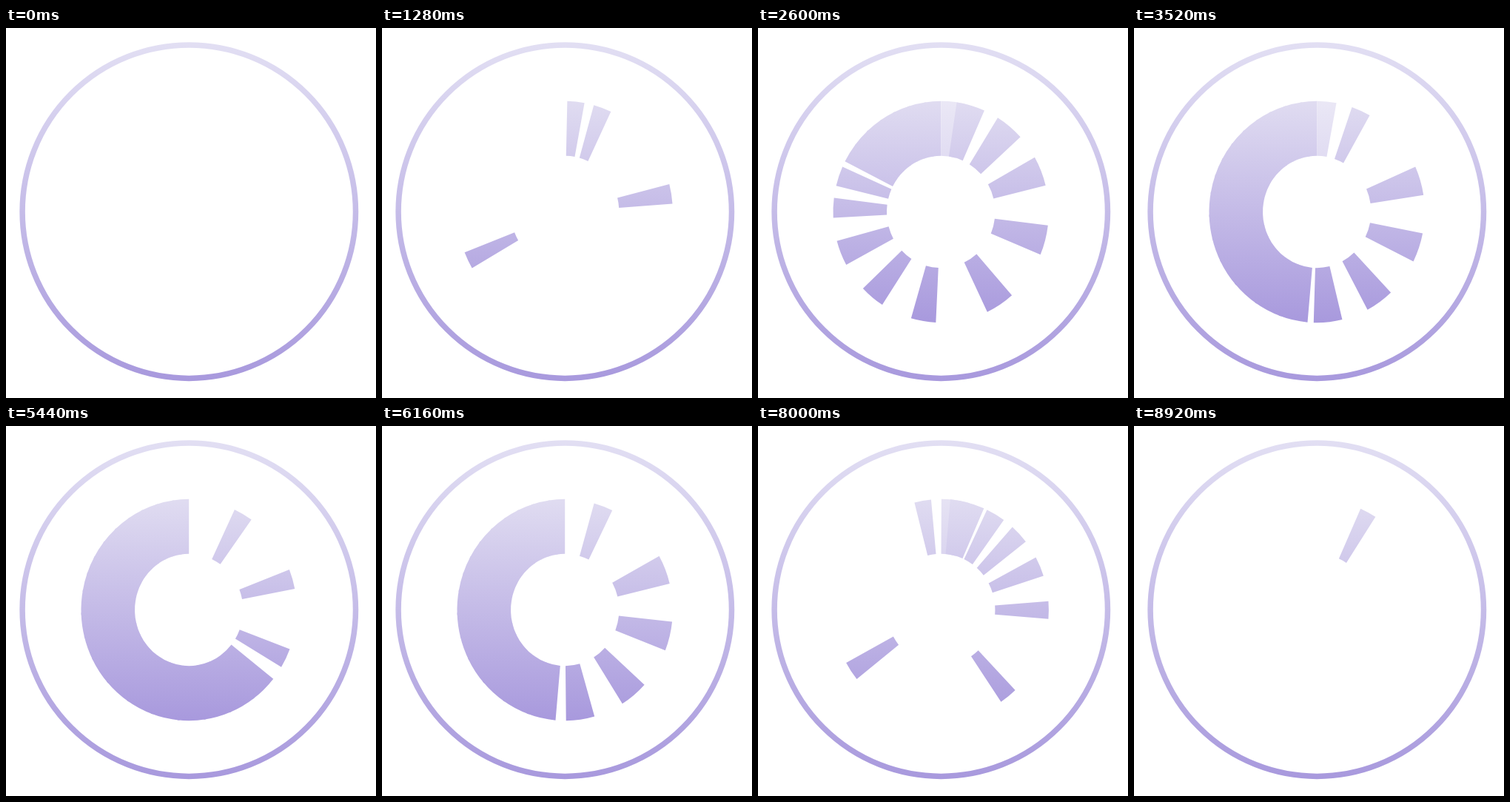
Animation, 500 px wide and 500 px high, one loop 8960 ms. Source, as an HTML page:

```html
<!DOCTYPE html>
<html lang="en">
<head>
<meta charset="utf-8">
<title>Ring</title>
<style>
  html, body { margin: 0; width: 100%; height: 100%; overflow: hidden; background: #fff; }
  svg { display: block; width: 100%; height: 100%; }
</style>
</head>
<body>
<svg viewBox="0 0 500 500">
  <defs>
    <linearGradient id="ringTint" gradientUnits="userSpaceOnUse" x1="0" y1="19" x2="0" y2="477">
      <stop offset="0" stop-color="#e2dff3"/>
      <stop offset="1" stop-color="#a899dd"/>
    </linearGradient>
    <linearGradient id="sliceTint" gradientUnits="userSpaceOnUse" x1="0" y1="99" x2="0" y2="398">
      <stop offset="0" stop-color="#e0dcf1"/>
      <stop offset="1" stop-color="#a899dd"/>
    </linearGradient>
  </defs>
  <circle cx="247.3" cy="248.2" r="225.2" fill="none" stroke="url(#ringTint)" stroke-width="7.5"/>
  <g id="slices" fill="url(#sliceTint)"></g>
</svg>
<script>
const LOOP = 8960, STEP = 40;
const START = 560, PEAK = 4240, RETURN = 5440, MIRROR = 9650;
const COUNT = 23, TRAVEL = 1220, OVERLAP = 1.2;
const CX = 247.2, CY = 248.5;
const OUTER = [145.7, 149.7], INNER = [73.2, 75.7];

// The launch rate rises, then slows; slices between these are spaced evenly.
const keys = [
  { index: 1, launch: 525, rest: 351 },
  { index: 2, launch: 900, rest: 342 },
  { index: 3, launch: 1111, rest: 333.5 },
  { index: 4, launch: 1232, rest: 325.5 },
  { index: 9, launch: 1546, rest: 279.5 },
  { index: 12, launch: 1785, rest: 243 },
  { index: 16, launch: 2268, rest: 185 },
  { index: 20, launch: 2900, rest: 128.5 },
  { index: COUNT, launch: 3805, rest: 101 }
];

const clamp = x => Math.min(1, Math.max(0, x));
const mix = (a, b, p) => a + (b - a) * p;
const easeSine = p => (1 - Math.cos(Math.PI * p)) / 2;

function between(index, field) {
  const next = Math.max(1, keys.findIndex(key => key.index >= index));
  const a = keys[next - 1], b = keys[next];
  return mix(a[field], b[field], (index - a.index) / (b.index - a.index));
}

const group = document.getElementById("slices");
let edge = 360;
const slices = Array.from({ length: COUNT }, (_, i) => {
  const path = document.createElementNS("http://www.w3.org/2000/svg", "path");
  group.append(path);
  const launch = between(i + 1, "launch"), rest = between(i + 1, "rest");
  const width = Math.min(360, edge + OVERLAP) - rest;
  edge = rest;
  return { path, launch, rest, width };
});

// Angles run clockwise from the top.
function point([rx, ry], degrees) {
  const a = degrees * Math.PI / 180;
  return (CX + rx * Math.sin(a)).toFixed(2) + " " + (CY - ry * Math.cos(a)).toFixed(2);
}

function sector(from, to) {
  return `M${point(OUTER, from)}A${OUTER} 0 0 1 ${point(OUTER, to)}` +
         `L${point(INNER, to)}A${INNER} 0 0 0 ${point(INNER, from)}Z`;
}

function sceneTime(t) {
  if (t < START) return 0;
  return t < RETURN ? Math.min(t, PEAK) : MIRROR - t;
}

function draw(now) {
  const t = sceneTime(Math.floor(now % LOOP / STEP) * STEP);
  for (const { path, launch, width, rest } of slices) {
    const age = t - launch;
    const from = rest * easeSine(clamp(age / TRAVEL));
    path.setAttribute("d", sector(from, from + width));
    path.setAttribute("opacity", age < 0 ? 0 : clamp(0.4 + age / 60));
  }
}

let origin;
function tick(now) {
  origin ??= now;
  draw(now - origin);
  requestAnimationFrame(tick);
}
draw(0);
requestAnimationFrame(tick);
</script>
</body>
</html>
```
